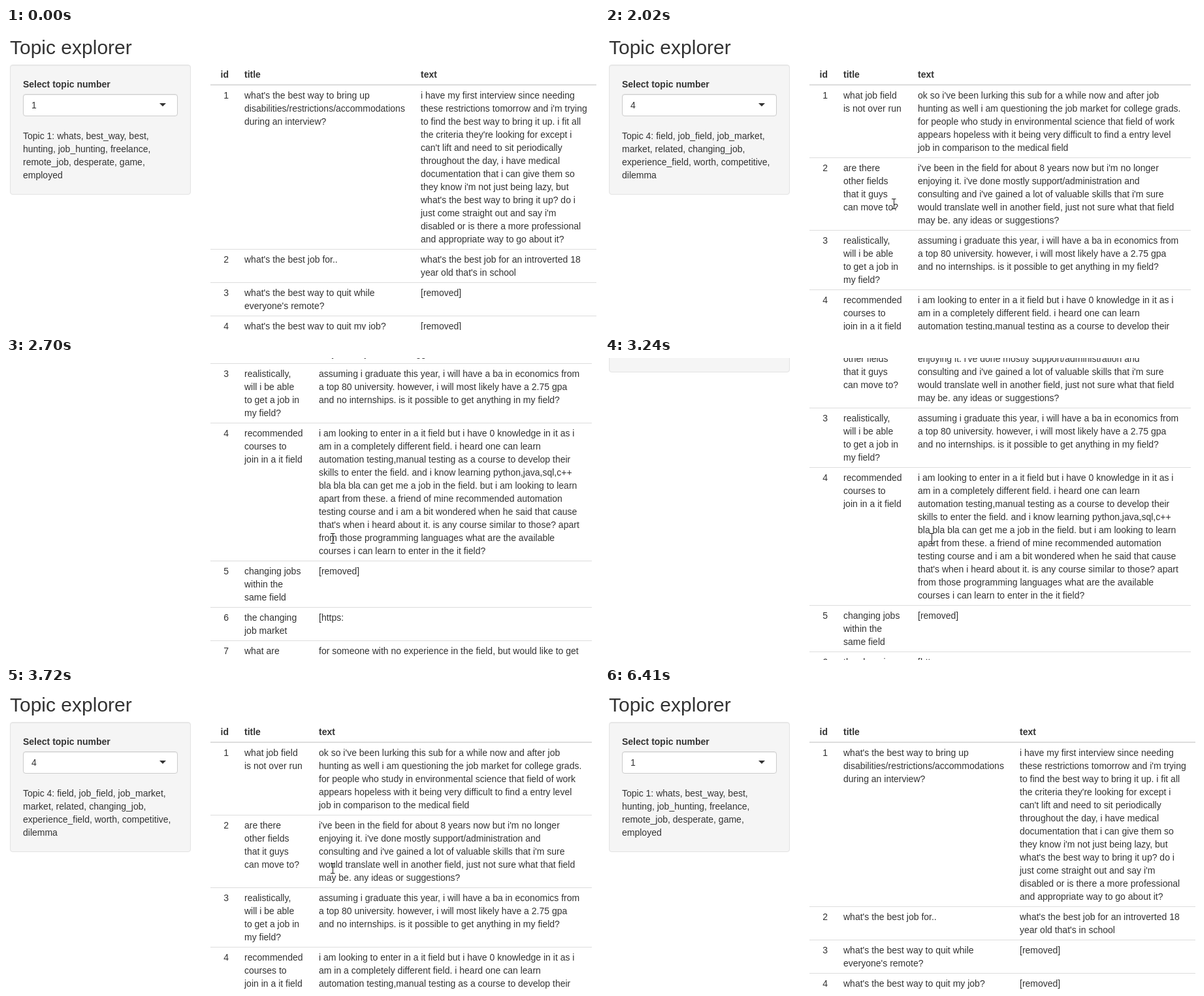
An HTML page that plays this animation: 908 px wide and 462 px high, repeating every 6.68 s.

```html
<!DOCTYPE html>
<html lang="en">
<head>
<meta charset="utf-8">
<title>Topic explorer</title>
<style>
  html, body { margin: 0; width: 100%; height: 100%; overflow: hidden; background: #fff; }
  body { position: relative; font: 14px/20px 'Liberation Sans', Arial, sans-serif; color: #333; }
  #page, #page > *, #cursor { position: absolute; box-sizing: border-box; }
  #page { left: 0; top: 0; width: 908px; height: 1000px; }
  h2 { left: 6px; top: 13px; margin: 0; font: 30px/33px 'Liberation Sans', Arial, sans-serif; }
  #panel { left: 6px; top: 56px; width: 277px; height: 199px; padding: 19px; white-space: pre;
    background: #f5f5f5; border: 1px solid #e3e3e3; border-radius: 4px;
    box-shadow: inset 0 1px 1px rgba(0,0,0,.05); }
  #words { margin-top: 59px; }
  #select { left: 26px; top: 101px; width: 237px; height: 34px; padding: 6px 12px;
    background: #fff; border: 1px solid #ccc; border-radius: 4px;
    box-shadow: inset 0 1px 1px rgba(0,0,0,.075); }
  #select.focus { border-color: #66afe9;
    box-shadow: inset 0 1px 1px rgba(0,0,0,.075), 0 0 8px rgba(102,175,233,.6); }
  #select::after { content: ''; position: absolute; right: 17px; top: 13px;
    border: solid transparent; border-width: 5px 5px 0; border-top-color: #333; }
  #select.open::after { border-width: 0 5px 5px; border-bottom-color: #333; }
  #list { left: 26px; top: 137px; width: 237px; height: 202px; padding: 5px 0; overflow: hidden;
    background: #fff; border: 1px solid #d0d0d0; border-radius: 0 0 4px 4px;
    box-shadow: 0 6px 12px rgba(0,0,0,.175); }
  #list p { margin: 0; padding: 3px 12px; }
  #list p.on { background: #f5f5f5; color: #262626; }
  #list svg { position: absolute; right: 0; top: 0; }
  .table { left: 313px; top: 56px; }
  .row { display: grid; column-gap: 24px; padding: 5px 0; border-top: 1px solid #ddd; white-space: pre; }
  .row > :first-child { text-align: right; }
  .head { font-weight: bold; border-top: 0; border-bottom: 2px solid #ddd; }
  .head + .row { border-top: 0; }
  #cursor { left: 0; top: 0; overflow: visible; }
</style>
</head>
<body>
<div id="page">
  <h2>Topic explorer</h2>
  <div id="panel"><b>Select topic number</b><div id="words"></div></div>
  <div id="select"></div>
  <div id="list">
    <svg width="17" height="200">
      <path fill="#f1f1f1" d="M0 0h17v200H0z"/>
      <path fill="#c1c1c1" d="M2 17h13v18H2z"/>
      <path fill="#a3a3a3" d="M5 11h7l-3.5-4z"/>
      <path fill="#505050" d="M5 189h7l-3.5 4z"/>
    </svg>
  </div>
</div>
<svg id="cursor" width="1" height="1" fill="#fff" stroke="#222" stroke-linejoin="round">
  <circle id="halo" r="15" fill="#fff700" fill-opacity=".55" stroke="none"/>
  <path id="shape"/>
</svg>
<script>
const LOOP = 6680, STEP = 66.6;
const $ = id => document.getElementById(id);

const topics = {
  1: {
    words: `Topic 1: whats, best_way, best,
hunting, job_hunting, freelance,
remote_job, desperate, game,
employed`,
    width: 591, col: 246,
    rows: [
      [`what's the best way to bring up
disabilities/restrictions/accommodations
during an interview?`, `i have my first interview since needing
these restrictions tomorrow and i'm trying
to find the best way to bring it up. i fit all
the criteria they're looking for except i
can't lift and need to sit periodically
throughout the day, i have medical
documentation that i can give them so
they know i'm not just being lazy, but
what's the best way to bring it up? do i
just come straight out and say i'm
disabled or is there a more professional
and appropriate way to go about it?`],
      [`what's the best job for..`, `what's the best job for an introverted 18
year old that's in school`],
      [`what's the best way to quit while
everyone's remote?`, '[removed]'],
      [`what's the best way to quit my job?`, '[removed]']
    ]
  },
  4: {
    words: `Topic 4: field, job_field, job_market,
market, related, changing_job,
experience_field, worth, competitive,
dilemma`,
    width: 584, col: 90,
    rows: [
      [`what job field
is not over run`, `ok so i've been lurking this sub for a while now and after job
hunting as well i am questioning the job market for college grads.
for people who study in environmental science that field of work
appears hopeless with it being very difficult to find a entry level
job in comparison to the medical field`],
      [`are there
other fields
that it guys
can move to?`, `i've been in the field for about 8 years now but i'm no longer
enjoying it. i've done mostly support/administration and
consulting and i've gained a lot of valuable skills that i'm sure
would translate well in another field, just not sure what that field
may be. any ideas or suggestions?`],
      [`realistically,
will i be able
to get a job in
my field?`, `assuming i graduate this year, i will have a ba in economics from
a top 80 university. however, i will most likely have a 2.75 gpa
and no internships. is it possible to get anything in my field?`],
      [`recommended
courses to
join in a it field`, `i am looking to enter in a it field but i have 0 knowledge in it as i
am in a completely different field. i heard one can learn
automation testing,manual testing as a course to develop their
skills to enter the field. and i know learning python,java,sql,c++
bla bla bla can get me a job in the field. but i am looking to learn
apart from these. a friend of mine recommended automation
testing course and i am a bit wondered when he said that cause
that's when i heard about it. is any course similar to those? apart
from those programming languages what are the available
courses i can learn to enter in the it field?`],
      [`changing jobs
within the
same field`, '[removed]'],
      [`the changing
job market`, '[https:'],
      [`what are
some good`, `for someone with no experience in the field, but would like to get
started, what would be a good first job to look for?`]
    ]
  }
};

for (const topic of Object.values(topics)) {
  const row = (cells, head = '') =>
    `<div class="row ${head}" style="grid-template-columns:28px ${topic.col}px 1fr">` +
    cells.map(c => `<div>${c}</div>`).join('') + '</div>';
  topic.table = document.createElement('div');
  topic.table.className = 'table';
  topic.table.style.width = topic.width + 'px';
  topic.table.innerHTML = row(['id', 'title', 'text'], 'head') +
    topic.rows.map((r, i) => row([i + 1, ...r])).join('');
  $('page').append(topic.table);
}

const options = [1, 2, 3, 4, 5, 6, 7, 8].map(n => {
  const p = document.createElement('p');
  p.textContent = n;
  $('list').append(p);
  return p;
});

const shapes = {
  arrow: 'M.5.5V18L4.6 14.2 7.4 21 10.6 19.7 7.8 13H13.4Z',
  hand: 'M-1.5 13V1.5a1.7 1.7 0 0 1 3.4 0V8a1.7 1.7 0 0 1 3 .6 1.7 1.7 0 0 1 3 .8 1.5 1.5 0 0 1 2.7 1' +
    'V15.5q0 2-1.2 3.8V22.5H.8V20.5L-5 13.6q-1-2 .6-2.6 1.4-.2 2.9 2ZM1.9 8v4M4.9 8.6v3.4M7.9 9.4v3',
  beam: 'M-3-7.5H0H3.5M.5-7.5V7.5M-3 7.5H0H3.5'
};

// start, steps, x, y
const moves = [
  [930, 6, 128, 234], [1880, 4, 500, 276], [3920, 4, 152, 136], [4330, 4, 143, 121],
  [5410, 5, 144, 151], [6140, 1, 687, 406], [6210, 1, 681, 396]
];

const between = (t, ...spans) => spans.some(([a, b]) => t >= a && t < b);
const progress = (t, start, n) =>
  Math.min(n, Math.max(0, Math.floor((t - start) / STEP) + 1)) / n;

function scrollAt(t) {
  return Math.round(t < 3240
    ? 311.5 * (1 - (1 - progress(t, 2360, 8)) ** 2.46)
    : 4 + 307.5 * (1 - progress(t, 3240, 8)) ** 2.22);
}

function cursorAt(t) {
  let x = 139, y = 124;
  for (const [start, n, toX, toY] of moves) {
    const u = progress(t, start, n), e = u * u * (3 - 2 * u);
    x += (toX - x) * e;
    y += (toY - y) * e;
  }
  return [Math.round(x), Math.round(y)];
}

function draw(t) {
  const scroll = scrollAt(t), [x, y] = cursorAt(t);
  const open = between(t, [440, 1550], [4800, 5950]);
  const focus = between(t, [370, 1550], [4730, 5950]);
  const value = between(t, [1550, 5950]) ? 4 : 1;
  const shown = between(t, [1620, 5950]) ? 4 : 1;

  $('page').style.transform = `translateY(${-scroll}px)`;
  $('select').textContent = value;
  $('select').className = (focus ? 'focus ' : '') + (open ? 'open' : '');
  $('words').textContent = topics[shown].words;
  for (const n in topics) topics[n].table.style.display = n == shown ? '' : 'none';

  $('list').style.display = open ? '' : 'none';
  const over = Math.floor((y + scroll - 143) / 26);
  const active = over >= 0 ? over : value - 1;
  options.forEach((p, i) => p.className = i === active ? 'on' : '');

  const onSelect = x > 26 && x < 263 && y + scroll > 101 && y + scroll < 135;
  const kind = open || onSelect ? 'hand' : x > 313 ? 'beam' : 'arrow';
  $('cursor').style.display = between(t, [300, 6410]) ? '' : 'none';
  $('cursor').style.transform = `translate(${x}px,${y}px)`;
  $('shape').setAttribute('d', shapes[kind]);
  $('shape').setAttribute('fill', kind === 'beam' ? 'none' : '#fff');
  $('halo').style.display =
    between(t, [370, 930], [1480, 1550], [4730, 5410], [5880, 5950]) ? '' : 'none';
}

const begin = performance.now();
function tick() {
  draw((performance.now() - begin) % LOOP);
  requestAnimationFrame(tick);
}
tick();
</script>
</body>
</html>
```
